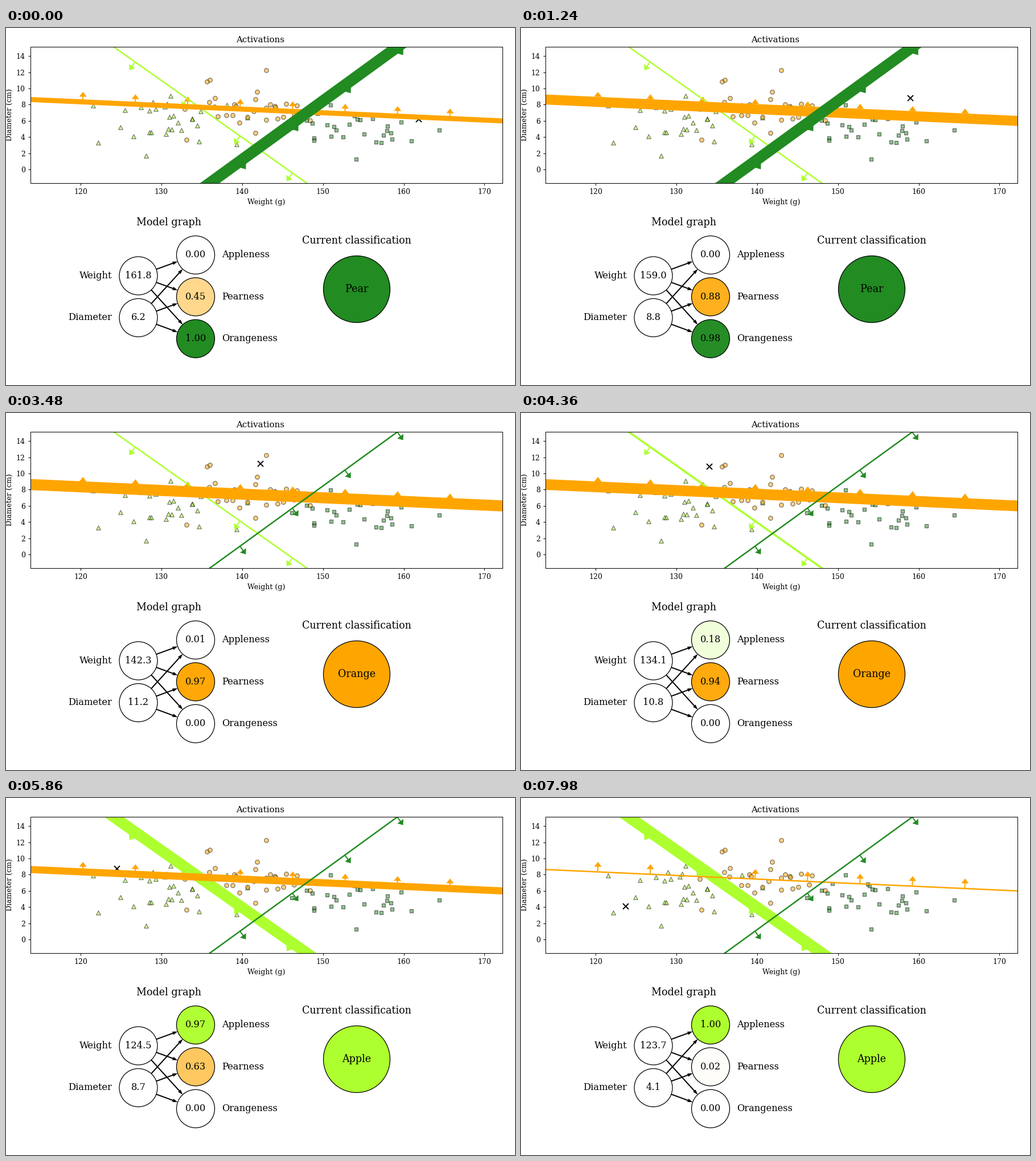
A matplotlib script for the animation above (8000 ms loop, 894 by 626 pixels).

```python
import numpy as np
import matplotlib.pyplot as plt
from matplotlib.animation import FuncAnimation
from matplotlib.collections import PolyCollection
from matplotlib.colors import to_rgb
from matplotlib.patches import Circle, Polygon

W, H, DPI = 894, 626, 90
SCALE = 14.19                              # pixels per data unit, both axes
LEFT, RIGHT, TOP, BOTTOM = 42.5, 871.5, 32.5, 272
STEP_MS, LOOP_MS = 20, 8000

plt.rcParams["font.family"] = "DejaVu Serif"


def to_data(px, py):
    return 120 + (np.asarray(px) - 130.9) / SCALE, (248 - np.asarray(py)) / SCALE


# Samples in stage pixels: x, y pairs
APPLES = [153, 135.5, 162, 201, 200.5, 174, 208.5, 143.5, 224, 190, 236.5, 139,
          246, 224, 251.5, 144.5, 252, 183, 255, 183, 257.5, 130, 262.5, 141.5,
          278.5, 138, 281, 186, 282.5, 132.5, 284.5, 177, 286.5, 156,
          288.5, 118.5, 291, 177.5, 293.5, 153.5, 301.5, 166, 308, 178.5,
          326.5, 158.5, 326.5, 160, 335.5, 171, 339, 199, 342, 145.5,
          388, 134.5, 404.5, 204, 424, 157]
ORANGES = [352.5, 93.5, 358, 91, 357, 130, 367, 123, 366, 138, 371.5, 155,
           314, 141.5, 317, 195.5, 386.5, 152.5, 397.5, 152.5, 401, 133.5,
           403.5, 137, 410, 166, 424, 156, 435, 146, 437.5, 124.5, 440.5, 112,
           437.5, 184, 456.5, 73.5, 456.5, 140, 456.5, 161, 463.5, 133.5,
           471.5, 137, 472.5, 139, 477, 158.5, 487, 156, 491.5, 132.5,
           505.5, 151.5, 511, 135.5, 534, 161.5]
PEARS = [502, 175, 528, 161.5, 538.5, 167, 541, 192.5, 540.5, 197, 547, 150,
         563.5, 169.5, 570, 134.5, 571, 190, 576, 173, 579.5, 178.5, 592, 191,
         603, 168.5, 609, 151, 612, 154, 614.5, 230, 617.5, 159.5, 621.5, 160.5,
         629, 185.5, 644, 158.5, 649.5, 199.5, 659.5, 201, 662.5, 188,
         669, 180, 670, 172, 675.5, 184, 678, 194.5, 694, 165, 712, 198,
         760.5, 178.5]


class Unit:
    """One output: a sigmoid of the height above a straight boundary."""

    def __init__(self, name, color, x0, y0, slope, gain, samples, marker, size):
        self.name, self.color = name, color
        self.x0, self.y0, self.slope, self.gain = x0, y0, slope, gain
        self.samples, self.marker, self.size = samples, marker, size

    def edge(self, x):
        return self.y0 + self.slope * (x - self.x0)

    def activation(self, x, y):
        return 1 / (1 + np.exp(-self.gain * (y - self.edge(x))))

    def normal(self):
        n = np.array([-self.slope, 1]) * np.sign(self.gain)
        return n / np.hypot(*n)


UNITS = [
    Unit("Apple", "greenyellow", 124.03, 15.2, -0.7044, -0.562, APPLES, "^", 36),
    Unit("Orange", "orange", 113.77, 8.64, -0.04523, 0.905, ORANGES, "o", 36),
    Unit("Pear", "forestgreen", 136.0, -1.69, 0.7246, -0.67, PEARS, "s", 18),
]


def arrow(base, u, length, head, half_head, half_shaft):
    """Outline of an arrow from base along the unit vector u."""
    u = np.asarray(u)
    v = np.array([-u[1], u[0]])
    neck = length - head
    parts = [(0, half_shaft), (neck, half_shaft), (neck, half_head), (length, 0),
             (neck, -half_head), (neck, -half_shaft), (0, -half_shaft)]
    return [base + a * u + b * v for a, b in parts]


def tint(color, amount):
    return tuple(1 - amount * (1 - c) for c in to_rgb(color))


fig = plt.figure(figsize=(W / DPI, H / DPI), dpi=DPI, facecolor="white")

# Upper plot
ax = fig.add_axes([LEFT / W, 1 - BOTTOM / H, (RIGHT - LEFT) / W, (BOTTOM - TOP) / H])
(xmin, xmax), (ymin, ymax) = to_data([LEFT, RIGHT], [BOTTOM, TOP])
ax.set(xlim=(xmin, xmax), ylim=(ymin, ymax),
       xticks=range(120, 171, 10), yticks=range(0, 15, 2))
ax.set_xlabel("Weight (g)")
ax.set_ylabel("Diameter (cm)")

far = np.array([xmin - 10, xmax + 10])
lines = []
for unit in UNITS:
    ax.scatter(*to_data(unit.samples[::2], unit.samples[1::2]), s=unit.size,
               marker=unit.marker, color=unit.color, edgecolors="black",
               linewidths=1, alpha=0.5, zorder=1)
    shapes = [arrow(np.array([x, unit.edge(x)]), unit.normal(), 17.6 / SCALE,
                    8.5 / SCALE, 6.5 / SCALE, 1 / SCALE)
              for x in np.linspace(xmin, xmax, 10)[1:-1]]
    ax.add_collection(PolyCollection(shapes, facecolors=unit.color,
                                     edgecolors="none", zorder=1.2),
                      autolim=False)
    lines += ax.plot(far, unit.edge(far), color=unit.color, zorder=2,
                     scalex=False, scaley=False)
cross, = ax.plot([], [], "x", color="black", ms=8, mew=1.5, zorder=1.5)

# Lower diagrams, in stage pixels
board = fig.add_axes([0, 0, 1, 1])
board.set(xlim=(0, W), ylim=(H, 0))
board.axis("off")


def label(x, y, text, size=13, ha="center", va="center"):
    return board.text(x, y, text, fontsize=size, ha=ha, va=va)


def disc(x, y, r):
    return board.add_patch(Circle((x, y), r, fc="white", ec="black", lw=1))


R = 33.5
INPUTS = [(232.5, 434.5), (232.5, 508)]
OUTPUTS = [(333, 398), (333, 471.3), (333, 544.8)]

for a in INPUTS:
    for b in OUTPUTS:
        gap = np.subtract(b, a)
        dist = np.hypot(*gap)
        u = gap / dist
        board.add_patch(Polygon(arrow(a + R * u, u, dist - 2 * R, 9, 3, 1),
                                fc="black", ec="none"))

label(447, 25, "Activations", 12, va="baseline")
label(286, 341, "Model graph", 14)
label(616, 372.5, "Current classification", 14)
for (x, y), text in zip(INPUTS, ["Weight", "Diameter"]):
    disc(x, y, R)
    label(186.3, y, text, ha="right")
for (x, y), text in zip(OUTPUTS, ["Appleness", "Pearness", "Orangeness"]):
    label(379.5, y, text, ha="left")

in_texts = [label(x, y, "") for x, y in INPUTS]
out_discs = [disc(x, y, R) for x, y in OUTPUTS]
out_texts = [label(x, y, "") for x, y in OUTPUTS]
verdict = disc(616, 458, 58.5)
verdict_text = label(616, 458, "", 14)


def update(i):
    # Poses come in threes, held for 20, 20 and 100 ms
    group, tick = divmod(i + 1, 7)
    pose = 3 * group + min(tick, 2) - 1
    angle = 2 * np.pi * pose / 300
    x = 141.844 + 20 * np.cos(angle)
    y = 6.222 + 5 * np.sin(angle)

    cross.set_data([x], [y])
    in_texts[0].set_text(f"{x:.1f}")
    in_texts[1].set_text(f"{y:.1f}")

    acts = [unit.activation(x, y) for unit in UNITS]
    for unit, a, line, node, text in zip(UNITS, acts, lines, out_discs, out_texts):
        line.set_linewidth(max(2, 16 * a))
        node.set_facecolor(tint(unit.color, a))
        text.set_text(f"{a:.2f}")

    best = UNITS[int(np.argmax(acts))]
    verdict.set_facecolor(best.color)
    verdict_text.set_text(best.name)
    return []


anim = FuncAnimation(fig, update, frames=LOOP_MS // STEP_MS, interval=STEP_MS,
                     init_func=lambda: update(0), repeat=True, repeat_delay=0,
                     cache_frame_data=False)
plt.show()
```
